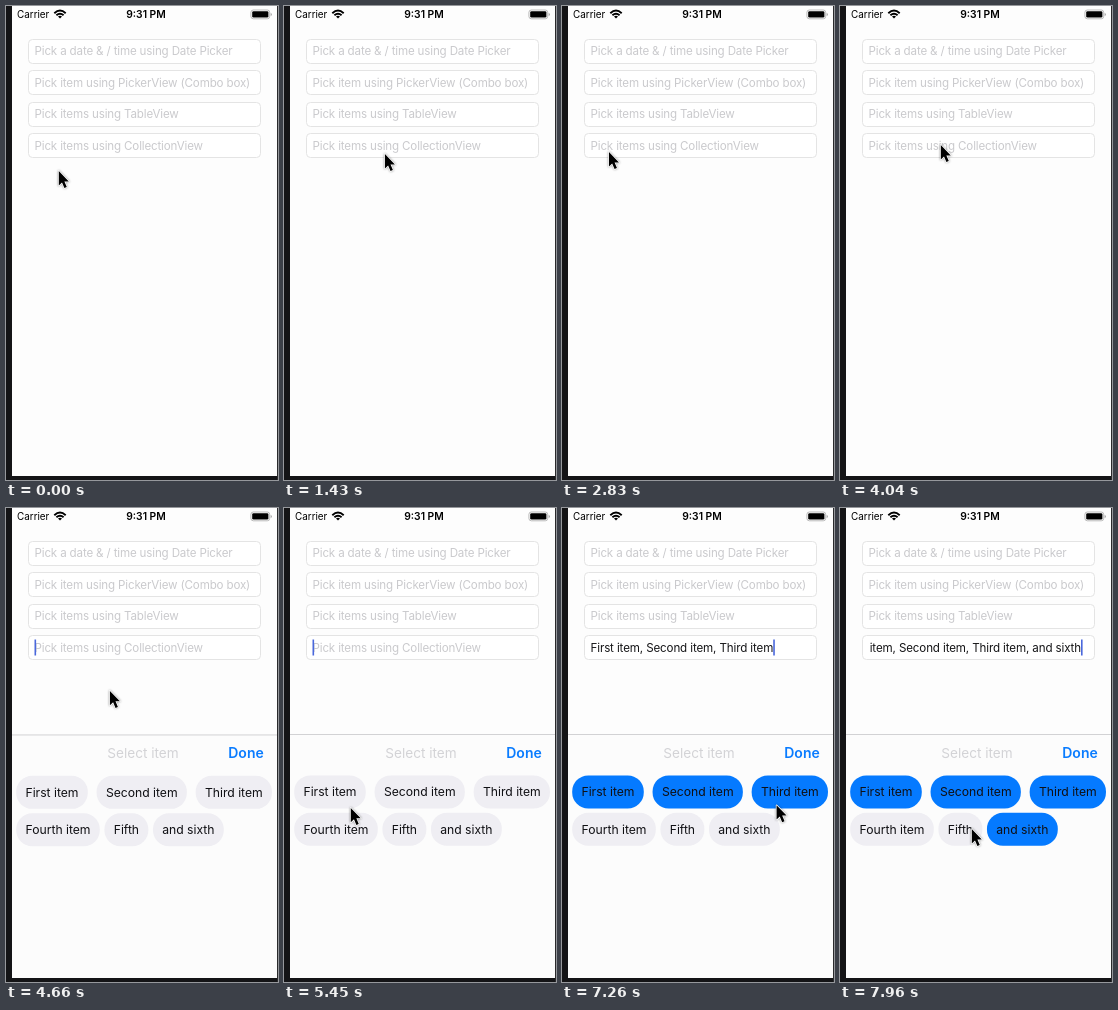
Recreate the animation shown at these times as an HTML page. Size 272 by 474 pixels, loop 8000 ms.

```html
<!DOCTYPE html>
<html lang="en">
<head>
<meta charset="utf-8">
<style>
  html, body { margin: 0; width: 100%; height: 100%; overflow: hidden; background: #fdfdfd; }
  svg { display: block; width: 272px; height: 474px; font: 11.6px Inter, "Liberation Sans", sans-serif; }
  .field { fill: #fff; stroke: #e4e4e4; }
  .hint { fill: #cacacd; letter-spacing: -.16px; }
  #value { fill: #151517; letter-spacing: -.13px; white-space: pre; }
  .chip rect { fill: #efeef3; }
  .chip.on rect { fill: #057aff; }
  .chip text { fill: #101014; font-size: 12.2px; letter-spacing: -.02px; }
</style>
</head>
<body>
<svg viewBox="0 0 272 474">
  <clipPath id="inner"><rect x="28" y="128" width="215" height="23"/></clipPath>
  <rect width="272" height="474" fill="#fdfdfd"/>

  <text x="11" y="12" font-size="9.9">Carrier</text>
  <g fill="none" stroke="#000" stroke-width="1.9">
    <path d="M48.3 7.2Q54 2 59.7 7.2M50.4 9.3Q54 6.2 57.6 9.3"/>
    <path d="M52 10.6Q54 9 56 10.6L54 12.6Z" fill="#000" stroke="none"/>
  </g>
  <text x="140" y="12" font-size="10.3" font-weight="600" text-anchor="middle">9:31 PM</text>
  <rect x="244.9" y="4" width="18.8" height="8.8" rx="2.4" fill="none" stroke="#aaa" stroke-width=".8"/>
  <rect x="246.2" y="5.2" width="16.2" height="6.4" rx="1.4"/>
  <path d="M264.6 7v3q1.4-.4 1.4-1.5t-1.4-1.5" fill="#aaa"/>

  <g id="fields"></g>
  <g clip-path="url(#inner)">
    <text id="value" y="144"></text>
    <rect id="caret" y="131.5" width="1.6" height="16" fill="#4a68dc"/>
  </g>

  <g id="panel">
    <rect x="6" y="227" width="265" height="243" fill="#fcfcfc"/>
    <path d="M6 226.5H271" stroke="#d2d2d4"/>
    <text x="137" y="250" font-size="13.6" text-anchor="middle" fill="#d3d3d6">Select item</text>
    <text x="240" y="250" font-size="14" font-weight="600" text-anchor="middle" fill="#0a7cff">Done</text>
    <g id="chips"></g>
  </g>

  <path d="M0 0H6V470H272V474H0Z" fill="#141416"/>
  <path d="M271.5 0V474" stroke="#2a2a2c"/>
  <path id="cursor" d="M.8 0V14.4L4 11.4L6.4 17L8.8 16L6.4 10.4H10.8Z"
    stroke="#fff" stroke-width="1.5" stroke-linejoin="round" paint-order="stroke"
    style="filter: drop-shadow(0 .8px .8px #0006)"/>
</svg>
<script>
const LOOP = 8000, OPEN = 4300, BLINK = 1000;
const $ = id => document.getElementById(id);

const hints = ["Pick a date &amp; / time using Date Picker", "Pick item using PickerView (Combo box)",
  "Pick items using TableView", "Pick items using CollectionView"];
$("fields").innerHTML = hints.map((hint, i) => {
  const y = 33.5 + i * 31.4;
  return `<rect class="field" x="22.5" y="${Math.floor(y) + .5}" width="232" height="24" rx="4"/>
    <text class="hint" x="28.5" y="${y + 15.8}">${hint}</text>`;
}).join("");
const lastHint = $("fields").lastElementChild;

const rows = [["First item", "Second item", "Third item"], ["Fourth item", "Fifth", "and sixth"]];
const taps = { "First item": 5880, "Second item": 6400, "Third item": 6850, "and sixth": 7530 };
const isOn = (label, t) => t >= taps[label];

// each chip is as wide as its label plus padding
rows.forEach((labels, row) => {
  let x = 10.2;
  const y = 267.4 + row * 37.4, gap = row ? 4.6 : 8.8;
  for (const label of labels) {
    $("chips").insertAdjacentHTML("beforeend", `<g class="chip"><rect y="${y}" height="33" rx="16"/>
      <text x="${x + 9.3}" y="${y + 21}">${label}</text></g>`);
    const [box, text] = $("chips").lastElementChild.children;
    const width = text.getComputedTextLength() + 18.6;
    box.setAttribute("x", x);
    box.setAttribute("width", width);
    x += width + gap;
  }
});

// pointer stops: time, x, y
const stops = [
  [80, 52, 165], [300, 32, 153], [600, 30, 151], [1430, 100, 148], [1800, 184, 147],
  [2140, 181, 147], [2830, 46, 146], [3000, 102, 153], [3400, 253, 456], [3870, 101, 153],
  [4040, 100, 139], [4500, 100, 139], [5100, 114, 336], [5450, 66, 300], [5710, 48, 283],
  [5880, 48, 283], [6090, 184, 281], [6570, 148, 293], [6850, 226, 286], [7170, 222, 291],
  [7530, 182, 321], [7960, 131, 321]];

function pointer(t) {
  const next = stops.findIndex(stop => stop[0] > t);
  if (next < 1) return stops.at(next).slice(1);
  const [t0, x0, y0] = stops[next - 1], [t1, x1, y1] = stops[next];
  const p = (t - t0) / (t1 - t0), ease = p * (1 + 3 * p - 2 * p * p) / 2;
  return [x0 + (x1 - x0) * ease, y0 + (y1 - y0) * ease];
}

function draw(t) {
  $("cursor").setAttribute("transform", `translate(${pointer(t)})`);

  const p = Math.min(1, Math.max(0, (t - OPEN + 60) / 480));
  $("panel").setAttribute("transform", `translate(0 ${245 * (1 - p) ** 3})`);

  for (const chip of $("chips").children)
    chip.classList.toggle("on", isOn(chip.textContent.trim(), t));

  const picked = Object.keys(taps).filter(label => isOn(label, t));
  const value = $("value");
  value.textContent = picked.join(", ");
  const width = picked.length ? value.getComputedTextLength() : 0;
  const x = Math.min(28.5, 241 - width);
  value.setAttribute("x", x);
  lastHint.style.display = picked.length ? "none" : "";

  const since = t - Math.max(OPEN, ...picked.map(label => taps[label]));
  $("caret").setAttribute("x", x + width);
  $("caret").style.display = since >= 0 && since % BLINK < BLINK * .55 ? "" : "none";
}

function tick(now) {
  draw(now % LOOP);
  requestAnimationFrame(tick);
}
draw(0);
requestAnimationFrame(tick);
</script>
</body>
</html>
```
